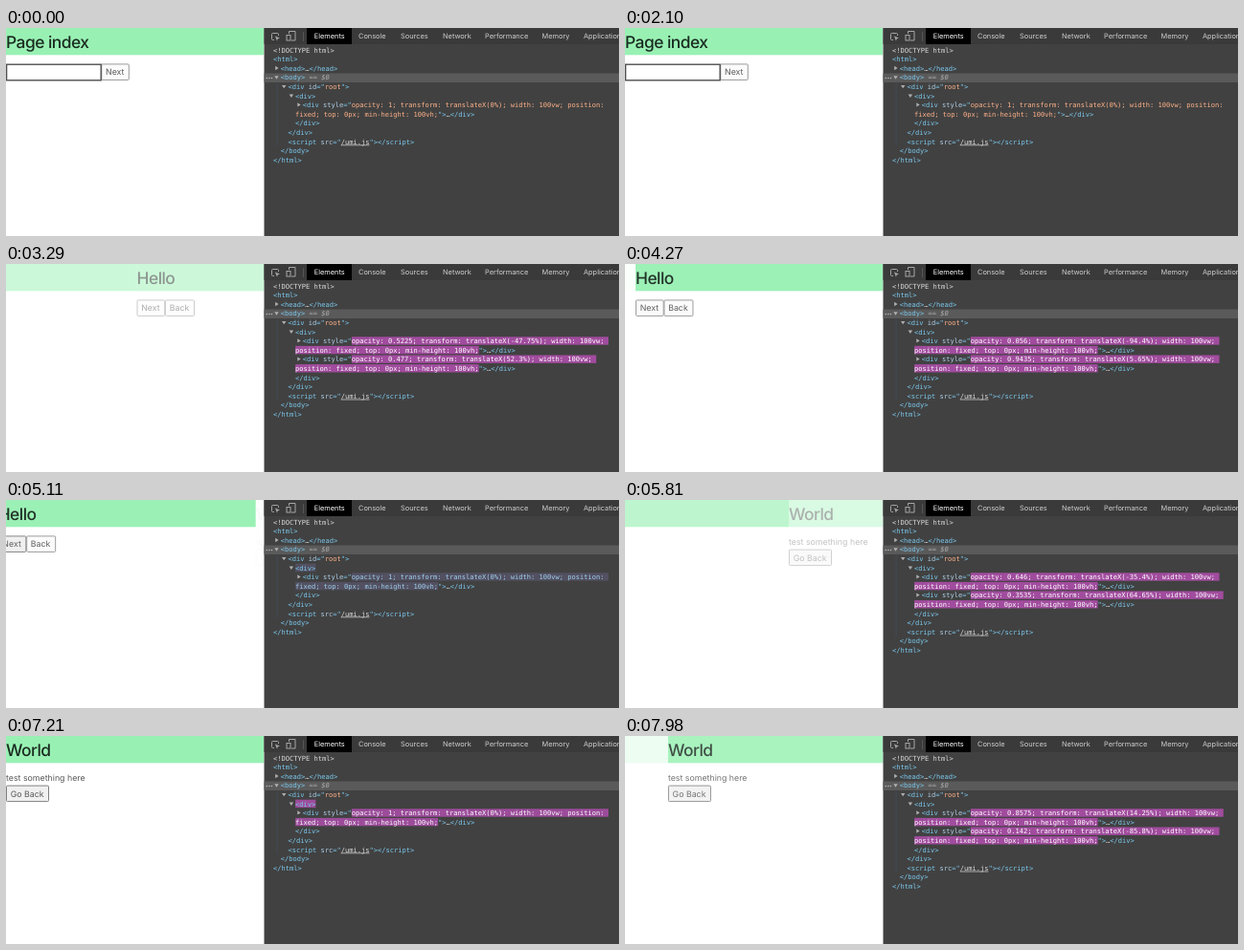
These frames come from a looping animation (640 px wide and 218 px high, 8 s). An HTML page:

```html
<!DOCTYPE html>
<html lang="en">
<head>
<meta charset="utf-8">
<title>Page transitions</title>
<style>
  html, body { margin: 0; width: 100%; height: 100%; overflow: hidden; background: #fff; }
  svg { display: block; width: 640px; height: 218px; }
  text { white-space: pre; text-rendering: geometricPrecision; }
  .page, .tabs { font-family: Inter, "Open Sans", sans-serif; }
  .page text { font-size: 8.8px; fill: #595959; }
  .page .title { font-size: 17.4px; font-weight: 500; letter-spacing: -.03em; fill: #1a2b20; }
  .tabs { font-size: 7.4px; fill: #cecece; }
  .tree { font: 7.07px "DejaVu Sans Mono", monospace; }
  .icon { fill: none; stroke: #a6a6a6; }
</style>
</head>
<body>
<svg viewBox="0 0 640 218">
  <defs><clipPath id="viewport"><rect width="269.5" height="218"/></clipPath></defs>
  <rect width="640" height="218" fill="#fff"/>
  <g clip-path="url(#viewport)" id="pages"></g>
  <rect x="269.5" width="370.5" height="218" fill="#414141"/>
  <rect x="269.5" width="370.5" height="17" fill="#3a3a3a"/>
  <g class="icon">
    <path d="M280 12.5h-1.5q-1 0-1-1v-5q0-1 1-1h5q1 0 1 1v1.5"/>
    <path d="M281 8.5l5 2-2.2.8-.9 2.2z" fill="#a6a6a6" stroke="none"/>
    <path d="M295.5 6V3.500h6.500v9.500h-4"/>
    <rect x="293" y="7.500" width="4" height="5.500"/>
    <path d="M310.500 4v10" stroke="#555"/>
  </g>
  <rect x="314" width="47" height="17" fill="#000"/>
  <g class="tabs" id="tabs"></g>
  <rect x="269.5" y="47.500" width="370.5" height="9.500" fill="#5a5a5a"/>
  <g fill="#c4c4c4"><circle cx="272.300" cy="52.500" r=".7"/><circle cx="274.900" cy="52.500" r=".7"/><circle cx="277.500" cy="52.500" r=".7"/></g>
  <g class="tree" id="tree"></g>
</svg>
<script>
const LOOP = 8000, STEP = 70, SLIDE = 2100, VIEW = 269;
const DOM_DELAY = 60;   // the inspector shows a new transition slightly late
const COLOR = { tag: '#7cc9ee', attr: '#afcfe8', value: '#ffb28a', plain: '#d4d4d4' };
const BACK = [65, 65, 65], FLASH = [161, 76, 158], FADED = [82, 80, 97];
const WHITE = [255, 255, 255], BLUE = [160, 208, 236], ORANGE = [255, 178, 138];

// start: inspector time of 0 %, lead: how far the page itself is ahead
const MOVES = [
  { start: 2287.7, lead: 32, from: 'index', to: 'hello', dir: 1 },
  { start: 5066.9, lead: 22, from: 'hello', to: 'world', dir: 1 },
  { start: 7681.3, lead: 52, from: 'world', to: 'hello', dir: -1 }
];

const byId = id => document.getElementById(id);
const clamp = v => Math.max(0, Math.min(1, v));
const rgb = c => `rgb(${c.map(Math.round)})`;
const mix = (a, b, k) => a.map((v, i) => v + (b[i] - v) * k);
const progress = (t, start) => clamp((t - start) / SLIDE);
const escapeText = s => s.replace(/&/g, '&amp;').replace(/</g, '&lt;');

// ---- left side: the sliding pages ----
const header = title => `<rect width="${VIEW}" height="28.3" fill="#98f1b3"/>
  <text class="title" x="0" y="20.6">${title}</text>`;

const button = (x, y, width, label, pressed) =>
  `<rect x="${x + .5}" y="${y + .5}" width="${width - 1}" height="16.5" rx="1"
    fill="${pressed ? '#f0f0f0' : '#fbfbfb'}" stroke="${pressed ? '#808080' : '#999'}"/>
  <text x="${x + 4.7}" y="${y + 11.9}">${label}</text>`;

const PAGES = {
  index: () => header('Page index') + button(99.3, 37.4, 29.5, 'Next') +
    '<rect x=".6" y="38.2" width="98.600" height="16.600" fill="#fff" stroke="#4f4f4f" stroke-width="1.4"/>',
  hello: leaving => header('Hello') + button(0, 37.4, 29.7, 'Next', leaving) +
    button(29.5, 37.4, 31, 'Back'),
  world: () => header('World') + '<text x="0" y="47.3">test something here</text>' +
    button(0, 51.6, 45, 'Go Back', true)
};

const page = (name, offset, opacity, leaving) =>
  `<g class="page" transform="translate(${offset * VIEW})" opacity="${opacity}">${PAGES[name](leaving)}</g>`;

function drawPages(t) {
  const move = MOVES.findLast(m => t >= m.start - m.lead);
  if (!move) return page('index', 0, 1);
  const p = progress(t, move.start - move.lead);
  return (p < 1 ? page(move.from, -move.dir * p, 1 - p, true) : '') +
    page(move.to, move.dir * (1 - p), p);
}

// ---- right side: the element tree ----
const CHAR = 4.256, ROW = 9.6, WRAP = 66;
const rowY = row => 25.5 + row * ROW;
const indent = depth => 279 + depth * 7.7;
const span = (kind, s, extra = '') => `<tspan fill="${COLOR[kind] || kind}" ${extra}>${escapeText(s)}</tspan>`;
const line = (row, depth, content) => `<text x="${indent(depth)}" y="${rowY(row)}">${content}</text>`;

function arrow(row, depth, open) {
  const shape = open ? 'm-2.2-1.3h4.400l-2.200 3.400z' : 'm-1.300-2.200v4.400l3.400-2.200z';
  return `<path d="M${indent(depth) - 4.2} ${rowY(row) - 2.7}${shape}" fill="#b0b0b0"/>`;
}

const flashBox = (row, x, length, color) =>
  `<rect x="${x}" y="${rowY(row) - 6.8}" width="${length * CHAR}" height="8.4" fill="${color}"/>`;

// the space at the break stays on the first line
function wrap(style) {
  const cut = style.lastIndexOf(' ', WRAP) + 1;
  return [style.slice(0, cut), style.slice(cut)];
}

function routeDiv(row, percent, box, ink) {
  const rounded = +(Math.sign(percent) * Math.ceil(Math.abs(percent) * 20) / 20).toFixed(2);
  const opacity = +(1 - Math.abs(rounded) / 100).toFixed(4);
  const [first, second] = wrap(`opacity: ${opacity}; transform: translateX(${rounded}%); ` +
    'width: 100vw; position: fixed; top: 0px; min-height: 100vh;');
  const boxes = box ? flashBox(row, indent(4) + 12 * CHAR, first.length, box) +
    flashBox(row + 1, indent(3), second.length, box) : '';
  return boxes + arrow(row, 4, false) +
    line(row, 4, span('tag', '<div') + span('attr', ' style') + span('tag', '="') + span(ink, first)) +
    line(row + 1, 3, span(ink, second) + span('tag', '">') + span('plain', '…') + span('tag', '</div>'));
}

function drawRoutes(t) {
  const move = MOVES.findLast(m => t >= m.start + DOM_DELAY);
  if (!move) return { rows: 2, content: routeDiv(6, 0, '', COLOR.value) };
  const p = progress(t, move.start) * 100;
  if (p < 100) {
    return { rows: 4, content: routeDiv(6, -move.dir * p, rgb(FLASH), '#fff') +
      routeDiv(8, move.dir * (100 - p), rgb(FLASH), '#fff') };
  }
  // the flash dims first, then everything returns to normal
  const age = t - move.start - SLIDE;
  const dim = clamp(age / 700), settle = clamp((age - 800) / 350);
  const box = rgb(mix(mix(FLASH, FADED, dim), BACK, settle));
  const ink = rgb(mix(mix(WHITE, BLUE, dim), ORANGE, settle));
  return { rows: 2, content: flashBox(5, indent(3), 5, box) + routeDiv(6, 0, box, ink) };
}

function drawTree(t) {
  const { rows, content } = drawRoutes(t), end = 6 + rows;
  return `<path d="M283 57.500V${rowY(end + 2) + 2}" stroke="#425062" stroke-width=".7"/>` +
    content +
    line(0, 0, span('#dcdcdc', '<!DOCTYPE html>')) +
    line(1, 0, span('tag', '<html>')) +
    arrow(2, 1, false) + line(2, 1, span('tag', '<head>') + span('plain', '…') + span('tag', '</head>')) +
    arrow(3, 1, true) + line(3, 1, span('tag', '<body>') + span('#adadad', ' == $0', 'font-style="italic"')) +
    arrow(4, 2, true) + line(4, 2, span('tag', '<div') + span('attr', ' id') + span('tag', '="') +
      span('value', 'root') + span('tag', '">')) +
    arrow(5, 3, true) + line(5, 3, span('tag', '<div>')) +
    line(end, 3, span('tag', '</div>')) +
    line(end + 1, 2, span('tag', '</div>')) +
    line(end + 2, 2, span('tag', '<script') + span('attr', ' src') + span('tag', '="') +
      span('#dcdcdc', '/umi.js', 'text-decoration="underline"') + span('tag', '"></' + 'script>')) +
    line(end + 3, 1, span('tag', '</body>')) +
    line(end + 4, 0, span('tag', '</html>'));
}

const TABS = { Elements: 321.7, Console: 368, Sources: 412, Network: 456, Performance: 500, Memory: 559.5, Application: 603 };
byId('tabs').innerHTML = Object.entries(TABS).map(([name, x], i) =>
  `<text x="${x}" y="11.2" ${i ? '' : 'fill="#fff"'}>${name}</text>`).join('');

let shown = -1;
function tick() {
  const t = Math.floor(performance.now() % LOOP / STEP) * STEP;
  if (t !== shown) {
    shown = t;
    byId('pages').innerHTML = drawPages(t);
    byId('tree').innerHTML = drawTree(t);
  }
  requestAnimationFrame(tick);
}
tick();
</script>
</body>
</html>
```
